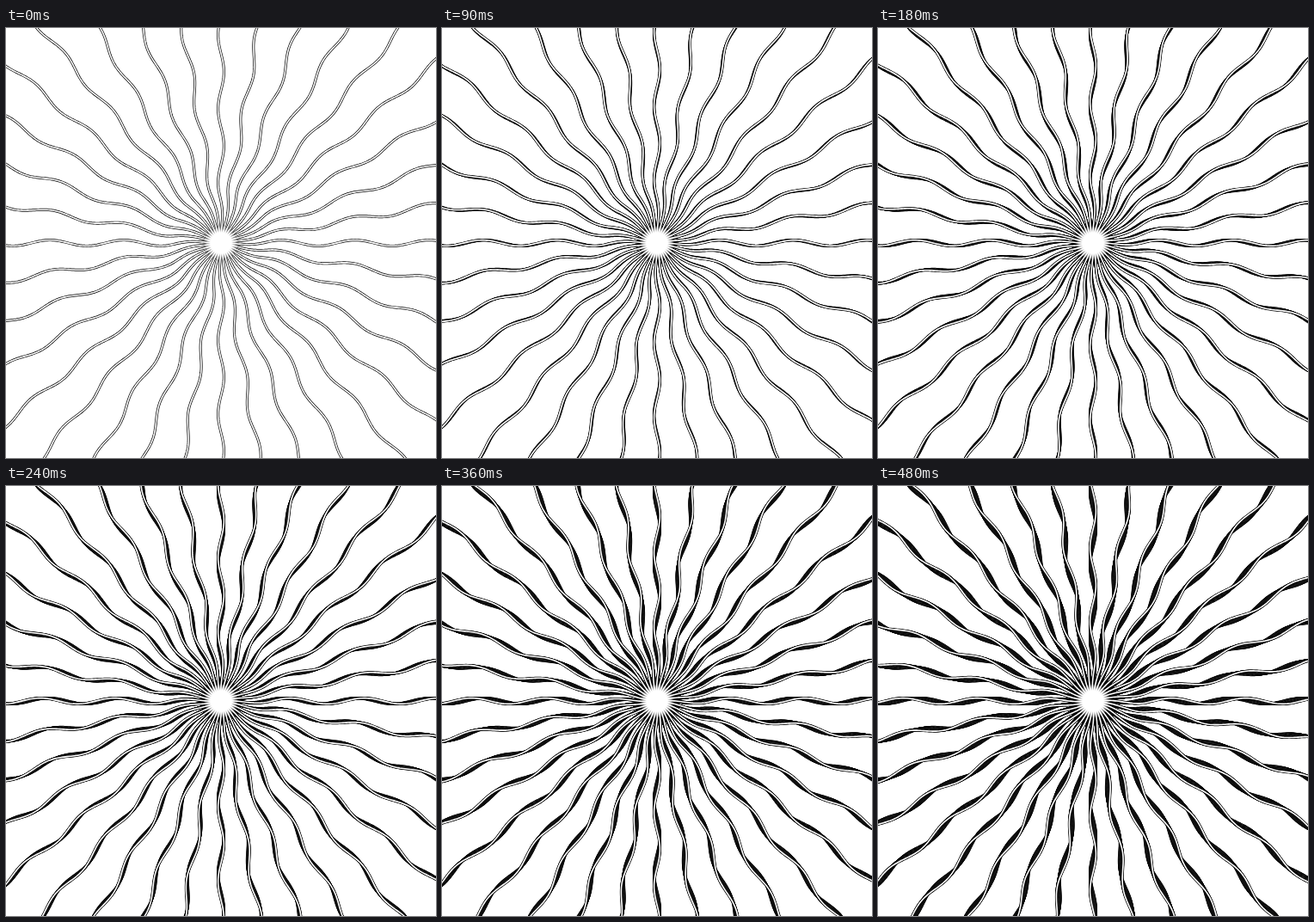
Write an HTML page with a canvas that moves like this. It is 500 px wide and 500 px high and loops after 510 ms.

```html
<!DOCTYPE html>
<html lang="en">
<head>
<meta charset="utf-8">
<title>Wavy rays</title>
<style>
  html, body { margin: 0; width: 100%; height: 100%; overflow: hidden; background: #fff; }
  canvas { display: block; width: 500px; height: 500px; }
</style>
</head>
<body>
<canvas id="stage" width="500" height="500"></canvas>
<script>
const ctx = document.getElementById('stage').getContext('2d');
const TAU = Math.PI * 2;
const STEPS = 17, STEP_MS = 30, RAYS = 36;
const AMP = 3.4, WAVE = 86, CREST = 70, DRIFT = 0.1;

// One ray pointing right; the wave drifts outward with the phase.
function makeRay(phase) {
  const ray = new Path2D();
  ray.moveTo(0, 0);
  for (let r = 2; r <= 362; r += 2) {
    const grow = Math.min(1, r / 60);
    ray.lineTo(r, -AMP * grow * Math.cos(TAU * (r - CREST) / WAVE - phase));
  }
  return ray;
}

function strokeRays(ray, color, width) {
  ctx.strokeStyle = color;
  ctx.lineWidth = width;
  for (let i = 0; i < RAYS; i++) {
    ctx.save();
    ctx.translate(250, 250);
    ctx.rotate(i * TAU / RAYS);
    ctx.stroke(ray);
    ctx.restore();
  }
}

// Each step lays a new white-cored ray over the earlier ones.
function draw(step) {
  ctx.fillStyle = '#fff';
  ctx.fillRect(0, 0, 500, 500);
  for (let s = 0; s <= step; s++) {
    const ray = makeRay(s * DRIFT);
    strokeRays(ray, '#000', 3);
    strokeRays(ray, '#fff', 1.6);
  }
  const glow = ctx.createRadialGradient(250, 250, 12, 250, 250, 20);
  glow.addColorStop(0, '#fff');
  glow.addColorStop(1, 'rgba(255,255,255,0)');
  ctx.fillStyle = glow;
  ctx.fillRect(228, 228, 44, 44);
}

let shown = -1;
function tick() {
  const step = Math.floor(performance.now() / STEP_MS) % STEPS;
  if (step !== shown) draw(shown = step);
  requestAnimationFrame(tick);
}
tick();
</script>
</body>
</html>
```
